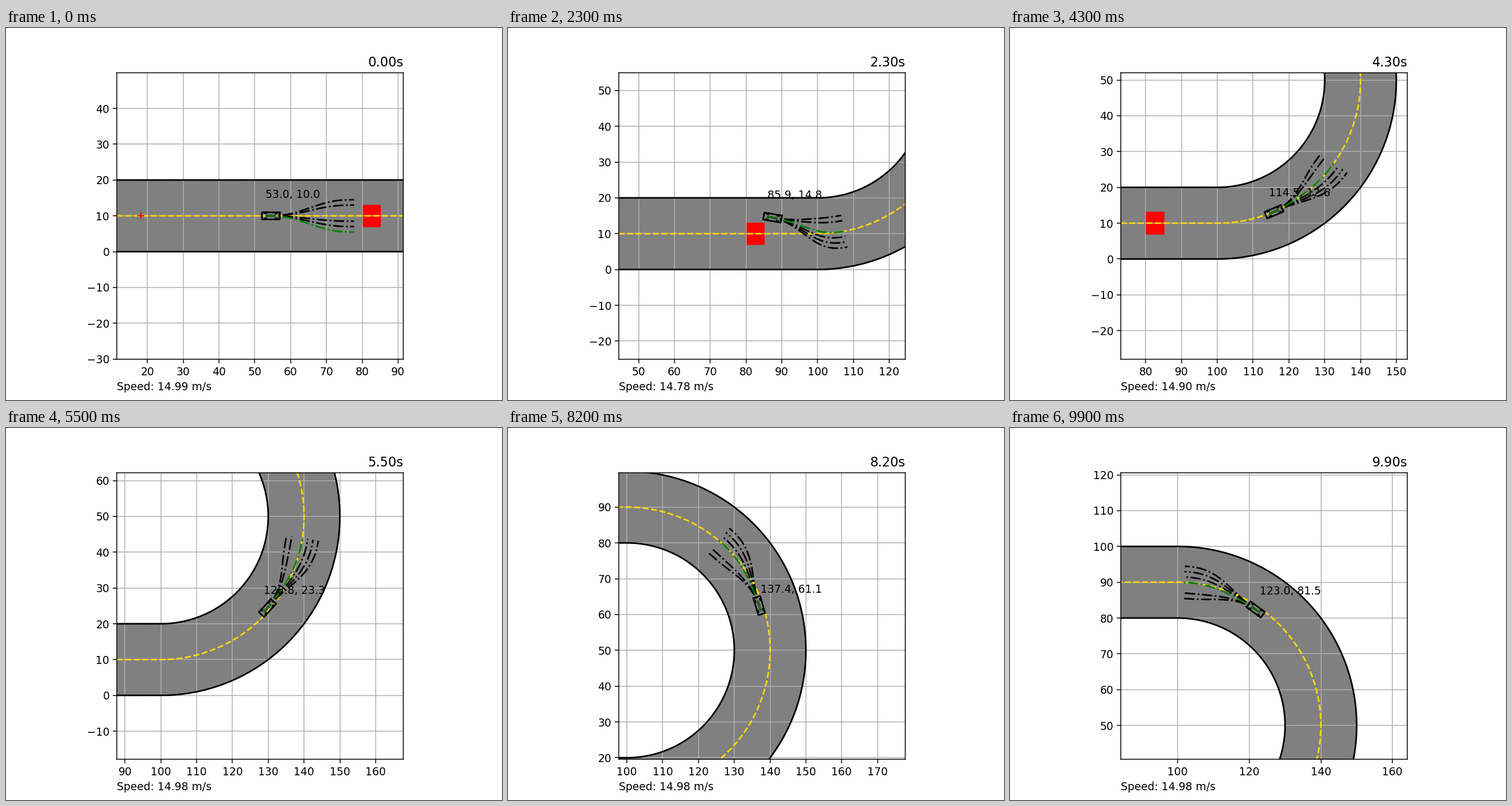
Recreate the animation shown at these times as a matplotlib script. Size 864x648 px, loop 10000 ms.

```python
import numpy as np
import matplotlib.pyplot as plt
from matplotlib.animation import FuncAnimation
from matplotlib.patches import Rectangle

FRAMES, DT = 100, 0.1
VIEW = 40
R, BEND = 40, 100            # centreline radius, station where the bend starts
ARC = np.pi * R
LANES = (4.5, 3.0, 0.0, -1.5, -3.0, -4.5)

# Car motion along the road: time, station, offset and their rates
T, S, D, DS, DD = np.array([
    (0.0, 53.00, -0.004, 14.99, -0.2),
    (1.5, 74.60, 4.40, 14.10, 4.2),
    (3.1, 97.30, 1.70, 14.18, -4.35),
    (5.5, 132.92, 0.75, 15.28, 0.1),
    (7.0, 155.91, 1.00, 15.364, 0.0),
    (9.9, 200.46, 1.00, 15.364, 0.0),
]).T


def road_xy(s, d):
    """Map station s and left offset d to the plane."""
    s = np.asarray(s, float)
    a = np.clip((s - BEND) / R, 0, np.pi)
    r = R - d
    x = BEND + r * np.sin(a) + np.minimum(s - BEND, 0) - np.maximum(s - BEND - ARC, 0)
    return x, 50 - r * np.cos(a)


def hermite(t, p, m):
    i = min(np.searchsorted(T, t, side="right") - 1, len(T) - 2)
    h = T[i + 1] - T[i]
    u = (t - T[i]) / h
    ease = u * u * (3 - 2 * u)
    return (p[i] + (p[i + 1] - p[i]) * ease
            + h * m[i] * u * (1 - u) ** 2 + h * m[i + 1] * u * u * (u - 1))


def station(t):
    if t < 0:
        return S[0] + DS[0] * t, D[0]
    return hermite(t, S, DS), hermite(t, D, DD)


def car_pose(t, e=0.01):
    s, d = station(t)
    (s0, d0), (s1, d1) = station(t - e), station(t + e)
    x, y = road_xy(s, d)
    xa, ya = road_xy(s0, d0)
    xb, yb = road_xy(s1, d1)
    return s, d, (d1 - d0) / (s1 - s0), x, y, np.arctan2(yb - ya, xb - xa)


def lane_path(s, d, slope, length, goal):
    """Quintic lane change that ends parallel to the road."""
    u = np.linspace(0, 1, 60)
    h0 = 1 - 10 * u**3 + 15 * u**4 - 6 * u**5
    h1 = u - 6 * u**3 + 8 * u**4 - 3 * u**5
    return road_xy(s + length * u, d * h0 + slope * length * h1 + goal * (1 - h0))


def chosen_lane(t):
    for end, lane in ((0.35, -4.5), (1.15, 4.5), (2.15, 3.0)):
        if t < end:
            return lane
    return 0.0


def box(x0, x1, y0, y1):
    return np.array([(x1, y1), (x1, y0), (x0, y0), (x0, y1), (x1, y1)]).T


# Car body and wheels, measured from the rear axle
LENGTH, WIDTH, BASE, TRACK = 4.97, 1.964, 2.96, 1.7
TYRE_R, TYRE_W = 0.2413, 0.1325
BACK = (LENGTH - BASE) / 2
PARTS = [box(-BACK, LENGTH - BACK, -WIDTH / 2, WIDTH / 2)]
PARTS += [box(cx - TYRE_R, cx + TYRE_R, cy - TYRE_W, cy + TYRE_W)
          for cx in (0, BASE) for cy in (TRACK / 2, -TRACK / 2)]

fig, ax = plt.subplots(figsize=(6.4, 4.8), dpi=135)
ax.set_aspect("equal")
ax.grid(True)

# Road
line = np.concatenate([[-50], np.linspace(BEND, BEND + ARC, 300), [BEND + ARC + 150]])
left, right = road_xy(line, 10), road_xy(line, -10)
ax.fill(np.append(left[0], right[0][::-1]), np.append(left[1], right[1][::-1]),
        color="gray", lw=0)
for edge in (left, right):
    ax.plot(*edge, color="black")
ax.plot(*road_xy(line, 0), "--", color="gold")
ax.add_patch(Rectangle((80, 7), 5, 6, color="red"))
ax.plot([18.2], [10], "+r")

# Moving parts
options = [ax.plot([], [], "-.", color="black")[0] for _ in LANES]
choice, = ax.plot([], [], "-.", color="green")
car = [ax.plot([], [], color="black")[0] for _ in PARTS]
label = ax.text(0, 0, "")


def update(i):
    t = i * DT
    s, d, slope, x, y, yaw = car_pose(t)

    cx, cy = road_xy(*station(t - DT))
    ax.set_xlim(cx - VIEW, cx + VIEW)
    ax.set_ylim(cy - VIEW, cy + VIEW)

    length = np.interp(t, (0, 1.5, 3.1, 5.5, 7.0), (24.7, 20.3, 22.8, 23.8, 23.4))
    best = chosen_lane(t)
    for goal, art in zip(LANES, options):
        blocked = goal == 0 and t < 2.15
        art.set_visible(not blocked and goal != best)
        art.set_data(*lane_path(s, d, slope, length, goal))
    choice.set_data(*lane_path(s, d, slope, length, best))

    c, n = np.cos(yaw), np.sin(yaw)
    for (px, py), art in zip(PARTS, car):
        art.set_data(x + c * px - n * py, y + n * px + c * py)

    label.set_position((x, y + 5))
    label.set_text(f"{x:.1f}, {y:.1f}")
    speed = np.interp(t, (0, 1.5, 3.1, 5.5), (14.99, 14.72, 14.83, 14.98))
    ax.set_title(f"{t:.2f}s", loc="right")
    ax.set_xlabel(f"Speed: {speed:.2f} m/s", loc="left")
    return []


anim = FuncAnimation(fig, update, frames=FRAMES, interval=100,
                     repeat=True, repeat_delay=0, blit=False)
plt.show()
```
